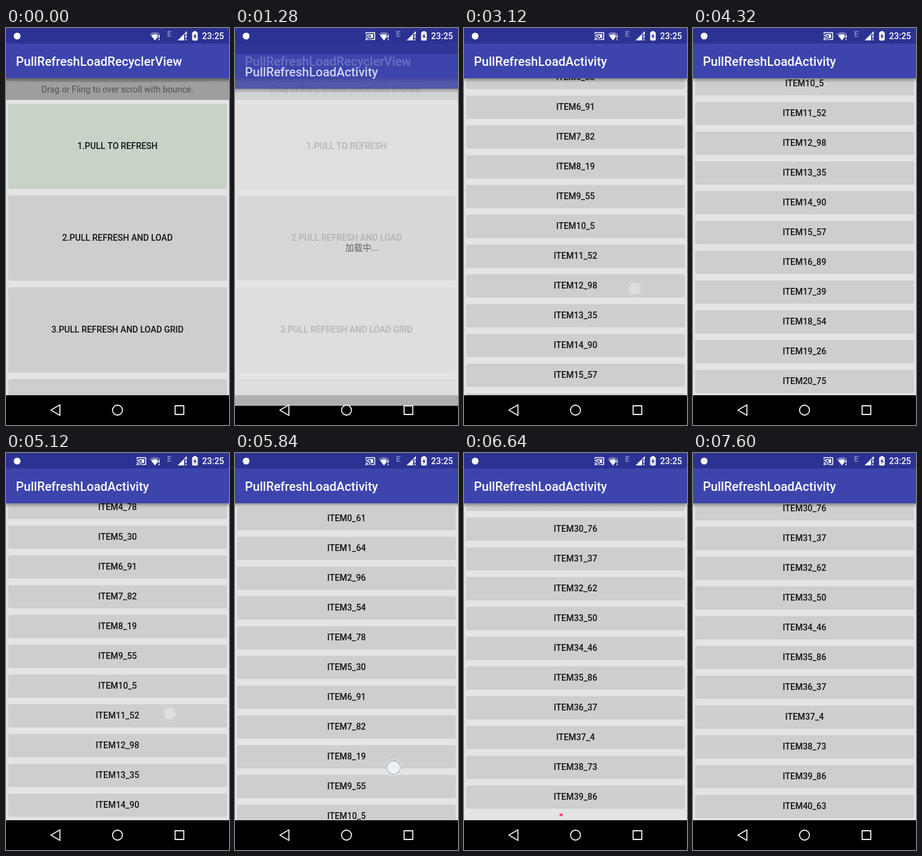
These frames come from a looping animation (360x640 px, 8 s). An HTML page with a canvas:

```html
<!DOCTYPE html>
<html lang="en">
<head>
<meta charset="utf-8">
<title>Pull, refresh and load</title>
<style>
html, body { margin: 0; width: 100%; height: 100%; overflow: hidden; background: #000; }
canvas { display: block; }
</style>
</head>
<body>
<canvas id="stage" width="360" height="640"></canvas>
<script>
const ctx = document.getElementById('stage').getContext('2d');
const LOOP = 8000, STEP = 80, ROW = 48, TOP = 81, BOTTOM = 592;
const SANS = 'Roboto, "Noto Sans CJK SC", "Noto Sans CJK", sans-serif';
const PAGE = '#e4e4e4', BAR = '#3d45ad', STATUS = '#2b3292', BUTTON = '#cdcecd';
const LIST_READY = 2160, MORE_READY = 4320, LAST_READY = 7600;

const values = [61, 64, 96, 54, 78, 30, 91, 82, 19, 55, 5, 52, 98, 35, 90, 57, 89, 39, 54, 26,
  75, 18, 43, 67, 92, 31, 80, 24, 59, 47, 76, 37, 62, 50, 46, 86, 37, 4, 73, 86, 63];
const menu = ['1.PULL TO REFRESH', '2.PULL REFRESH AND LOAD', '3.PULL REFRESH AND LOAD GRID', ''];

const scrollPath = [
  [2880, 0], [2960, 30], [3040, 120], [3120, 266], [3200, 370], [3280, 435], [3360, 470], [3520, 490], [3760, 496],
  [4880, 496], [4960, 450], [5040, 340], [5120, 210], [5200, 110], [5360, 25], [5520, 0],
  [5840, 0], [5920, 50], [6000, 170], [6080, 400], [6160, 680], [6240, 900], [6320, 1070],
  [6400, 1200], [6480, 1295], [6560, 1368], [6640, 1423], [6720, 1456]];
const slidePath = [[1200, 30], [1280, 17], [1360, 6], [1440, 1], [1520, 0]];
const fadePath = [[1200, .48], [1280, .77], [1360, 1]];

// Each touch: start, release, then x and y at both ends.
const touches = [
  [800, 960, 252, 350, 252, 350],
  [2880, 3040, 262, 520, 276, 420],
  [4880, 5040, 258, 270, 264, 420],
  [5840, 6000, 256, 507, 272, 345]];

const clamp = v => Math.min(1, Math.max(0, v));
const mix = (a, b, p) => a + (b - a) * p;

function track(t, points) {
  if (t <= points[0][0]) return points[0][1];
  for (let i = 1; i < points.length; i++) {
    const [t0, v0] = points[i - 1], [t1, v1] = points[i];
    if (t <= t1) return mix(v0, v1, (t - t0) / (t1 - t0));
  }
  return points[points.length - 1][1];
}

function rect(x, y, w, h, color) {
  ctx.fillStyle = color;
  ctx.fillRect(x, y, w, h);
}

function text(str, x, y, size, color, weight = 400, align = 'left') {
  ctx.font = `${weight} ${size}px ${SANS}`;
  ctx.textAlign = align;
  ctx.fillStyle = color;
  ctx.fillText(str, x, y);
}

function shape(points, close = true) {
  ctx.beginPath();
  points.forEach(([x, y]) => ctx.lineTo(x, y));
  if (close) ctx.closePath();
}

function disc(x, y, r, color) {
  ctx.beginPath();
  ctx.arc(x, y, r, 0, Math.PI * 2);
  ctx.fillStyle = color;
  ctx.fill();
}

function box(x, y, w, h, color) {
  ctx.beginPath();
  ctx.roundRect(x, y, w, h, 2);
  ctx.fillStyle = color;
  ctx.fill();
}

function button(y, h, label, color = BUTTON) {
  box(3.5, y + .5, 353, h + .7, 'rgba(0,0,0,.12)');
  box(4, y, 352, h, color);
  text(label, 180, y + h / 2 + 5, 14, '#121212', 500, 'center');
}

function appBar(title) {
  const shadow = ctx.createLinearGradient(0, TOP, 0, TOP + 7);
  shadow.addColorStop(0, 'rgba(0,0,0,.32)');
  shadow.addColorStop(1, 'rgba(0,0,0,0)');
  rect(0, TOP, 360, 7, shadow);
  rect(0, 0, 360, 25, STATUS);
  rect(0, 25, 360, 56, BAR);
  text(title, 16, 61, 20, '#fff', 500);
}

function clipContent() {
  ctx.beginPath();
  ctx.rect(0, TOP, 360, BOTTOM - TOP);
  ctx.clip();
}

function menuScreen(t) {
  rect(0, 0, 360, 640, '#000');
  ctx.save();
  clipContent();
  rect(0, TOP, 360, 511, PAGE);
  rect(0, TOP, 360, 35, '#9e9e9e');
  ctx.beginPath();
  ctx.ellipse(180, TOP, 200, 7, 0, 0, Math.PI);
  ctx.fillStyle = 'rgba(0,0,0,.08)';
  ctx.fill();
  text('Drag or Fling to over scroll with bounce.', 180, 104, 14, '#505050', 400, 'center');
  menu.forEach((label, i) => {
    const y = 122 + i * 148;
    button(y, 136, label, i ? BUTTON : '#c7d3c7');
    if (i === 1 && t >= 880) ripple(y, clamp((t - 800) / 320));
  });
  ctx.restore();
  appBar('PullRefreshLoadRecyclerView');
}

function ripple(y, p) {
  ctx.save();
  ctx.beginPath();
  ctx.roundRect(4, y, 352, 136, 2);
  ctx.clip();
  rect(4, y, 352, 136, `rgba(0,0,0,${.06 * p})`);
  disc(mix(252, 180, p), mix(350, y + 68, p), mix(20, 195, p), 'rgba(0,0,0,.11)');
  ctx.restore();
}

function loader(y, age) {
  text('加载中...', 178, y + 5, 14, '#484848');
  if (age <= 0) return;
  const ease = p => p * p * (3 - 2 * p);
  const p = age % 1333 / 1333;
  const start = .75 * ease(clamp(p * 2 - 1));
  const end = Math.max(start + .01, .75 * ease(clamp(p * 2)));
  const turn = p * .25 + age / 6665 * 2 - .25;
  ctx.beginPath();
  ctx.arc(154, y, 19, (start + turn) * Math.PI * 2, (end + turn) * Math.PI * 2);
  ctx.lineWidth = 4;
  ctx.lineCap = 'square';
  ctx.strokeStyle = '#ff4081';
  ctx.stroke();
  ctx.lineCap = 'butt';
}

function list(t) {
  const scroll = Math.round(track(t, scrollPath));
  const count = t < MORE_READY ? 20 : t < LAST_READY ? 40 : 41;
  for (let i = Math.max(0, Math.floor(scroll / ROW) - 1); i <= count; i++) {
    const y = TOP + i * ROW - scroll;
    if (y > BOTTOM) break;
    if (i < count) button(y + 6, 36, `ITEM${i}_${values[i]}`);
    else if (count < 41) loader(y + 24, t - (count === 20 ? 3300 : 6600));
  }
}

function listScreen(t) {
  rect(0, 0, 360, BOTTOM, PAGE);
  ctx.save();
  clipContent();
  if (t < LIST_READY) loader(337, t - 1290);
  else list(t);
  ctx.restore();
  rect(0, BOTTOM, 360, 48, '#000');
  appBar('PullRefreshLoadActivity');
}

// The incoming screen is blended as one layer.
const layer = document.createElement('canvas');
layer.width = 360;
layer.height = 640;
const layerCtx = layer.getContext('2d');

function transition(t) {
  listScreen(t);
  layerCtx.drawImage(ctx.canvas, 0, 0);
  menuScreen(t);
  ctx.globalAlpha = track(t, fadePath);
  ctx.drawImage(layer, 0, Math.round(track(t, slidePath)));
  ctx.globalAlpha = 1;
}

function castIcon() {
  ctx.strokeStyle = '#fff';
  ctx.lineWidth = 1.5;
  shape([[211.5, 10], [211.5, 7.5], [225.5, 7.5], [225.5, 18.5], [220, 18.5]], false);
  ctx.stroke();
  rect(214, 10, 9, 1.5, '#fff');
  rect(219, 11, 4, 5, '#fff');
  [4, 7.5].forEach(r => {
    ctx.beginPath();
    ctx.arc(211, 19.5, r, -Math.PI / 2, 0);
    ctx.stroke();
  });
  disc(212, 18.5, 1.3, '#fff');
}

function statusIcons(t) {
  disc(18, 13, 5.5, '#fff');
  if (t >= 80) castIcon();

  ctx.beginPath();
  ctx.moveTo(240.5, 20);
  ctx.lineTo(232, 9.5);
  ctx.quadraticCurveTo(240.5, 3.5, 249, 9.5);
  ctx.closePath();
  ctx.fillStyle = 'rgba(255,255,255,.35)';
  ctx.fill();
  shape([[240.5, 20], [234.5, 12.5], [237, 11], [240.5, 10.3], [244, 11], [246.5, 12.5]]);
  ctx.fillStyle = '#fff';
  ctx.fill();
  rect(245, 10, 4, 11, STATUS);
  rect(246.3, 11, 1.7, 5, '#fff');
  rect(246.3, 17.5, 1.7, 2, '#fff');

  text('E', 260, 14, 13, '#7c84c6', 700);

  shape([[277, 20], [292, 5], [292, 20]]);
  ctx.fillStyle = '#fff';
  ctx.fill();
  rect(287.5, 10, 5, 11, STATUS);
  rect(289.6, 11, 1.8, 5.5, '#fff');
  rect(289.6, 18, 1.8, 2, '#fff');

  rect(303, 5, 4, 2, '#fff');
  box(300.5, 6.3, 9, 14, '#fff');
  shape([[305.8, 8.5], [302.4, 14], [304.6, 14], [304.3, 18], [307.8, 12.4], [305.5, 12.4]]);
  ctx.fillStyle = STATUS;
  ctx.fill();

  text('23:25', 316.5, 18, 14, '#fff', 500);
}

function navIcons() {
  ctx.strokeStyle = '#e8e8e8';
  ctx.lineWidth = 1.8;
  ctx.lineJoin = 'round';
  shape([[72.5, 616], [87, 607.5], [87, 624.5]]);
  ctx.stroke();
  ctx.beginPath();
  ctx.arc(180, 616, 8, 0, Math.PI * 2);
  ctx.stroke();
  ctx.strokeRect(273, 609, 14, 14);
}

function pointer(t) {
  for (const [start, release, x0, y0, x1, y1] of touches) {
    if (t < start || t > release + 120) continue;
    const p = clamp((t - start) / (release - start));
    const x = mix(x0, x1, p), y = mix(y0, y1, p);
    ctx.globalAlpha = t > release ? .4 : 1;
    disc(x, y, 14, 'rgba(255,255,255,.25)');
    disc(x, y, 11, 'rgba(240,242,243,.9)');
    ctx.strokeStyle = '#a3b2c0';
    ctx.lineWidth = 1.3;
    ctx.stroke();
    ctx.globalAlpha = 1;
  }
}

function draw(now) {
  const t = Math.floor(now % LOOP / STEP) * STEP;
  if (t < 1200) menuScreen(t);
  else if (t < 1520) transition(t);
  else listScreen(t);
  statusIcons(t);
  navIcons();
  pointer(t);
}

const begin = performance.now();
function tick() {
  draw(performance.now() - begin);
  requestAnimationFrame(tick);
}
tick();
</script>
</body>
</html>
```
